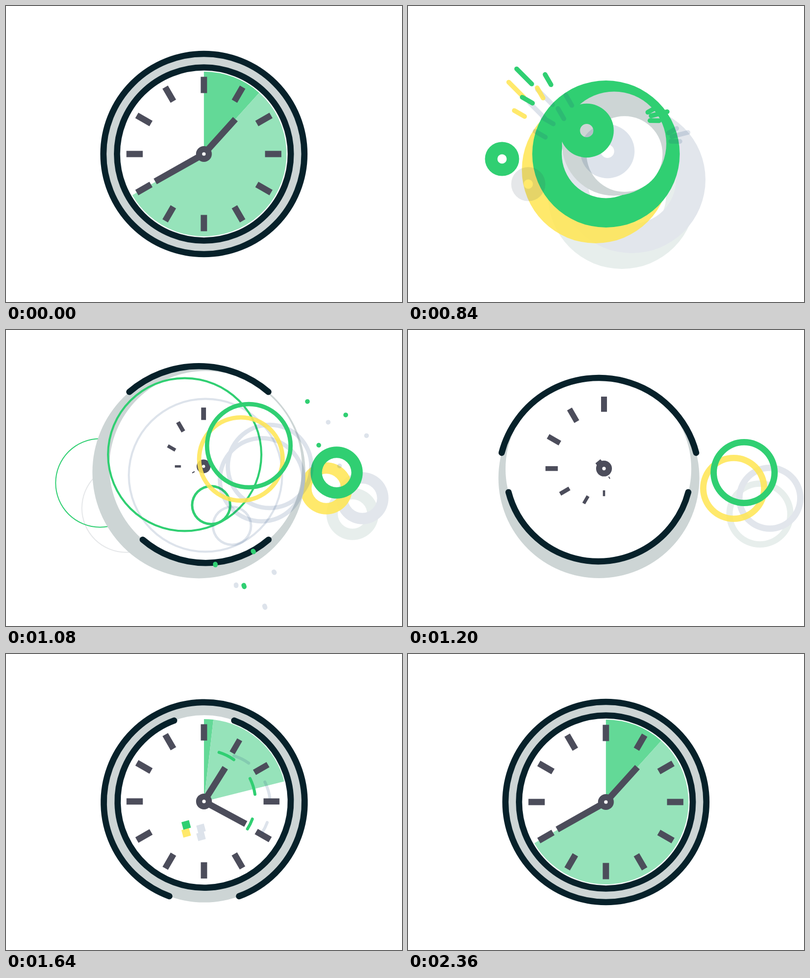
Recreate the animation shown at these times as an HTML page with a canvas. Size 800 by 600 pixels, loop 2.4 s.

```html
<!DOCTYPE html>
<html lang="en">
<head>
<meta charset="utf-8">
<title>Clock</title>
<style>
html, body { margin: 0; width: 100%; height: 100%; overflow: hidden; background: #fff; }
canvas { display: block; width: 800px; height: 600px; }
</style>
</head>
<body>
<canvas id="stage" width="800" height="600"></canvas>
<script>
const ctx = document.getElementById('stage').getContext('2d');
const LOOP = 2400, STEP = 40, START = 720, IMPACT = 960;
const TAU = Math.PI * 2, RAD = Math.PI / 180;
const DARK = '#07212a', GREY = '#cdd5d5', INK = '#4c4d5b', GREEN = '#30cf72';
const YELLOW = 'rgba(255,230,85,.87)', SHADE = 'rgba(30,70,120,.15)';

const clamp = v => Math.max(0, Math.min(1, v));
const easeOut = (u, p = 3) => 1 - (1 - clamp(u)) ** p;
const smooth = u => { u = clamp(u); return u * u * (3 - 2 * u); };

// Decaying swing after the impact: a at rest, b a quarter turn later
function swing(t, a, b, turn) {
  const s = Math.max(0, t - IMPACT), w = s / 240 * turn * RAD;
  return Math.exp(-s / 150) * (a * Math.cos(w) + b * Math.sin(w));
}

function disc(x, y, r, color) {
  ctx.fillStyle = color;
  ctx.beginPath();
  ctx.arc(x, y, Math.max(0, r), 0, TAU);
  ctx.fill();
}

// Half-open rim around the angle mid
function rim(c, mid, sweep) {
  ctx.strokeStyle = DARK;
  ctx.lineWidth = 12.6;
  ctx.lineCap = 'round';
  ctx.beginPath();
  ctx.arc(c.x, c.y, c.r, (mid - sweep) * RAD, (mid + sweep) * RAD);
  ctx.stroke();
}

// Layers are [color, ...offsets], back to front; offsets in a layer merge
const FAR = [['#e7eeec', [32, 84]], ['#e2e6ec', [52, 52]], [YELLOW, [-21, 32]], [GREEN, [0, 0]]];
const NEAR = [[SHADE, [26, 69], [42, 42]], [YELLOW, [-16, 27]], [GREEN, [0, 0]]];
const PLAIN = [[SHADE, [42, 42]], [GREEN, [0, 0]]];
const LEFT = [['rgba(60,70,90,.13)', [53, 51]], [GREEN, [0, 0]]];
const SQUARE = [[SHADE, [30, 23], [30, 7]], [YELLOW, [0, 16]], [GREEN, [0, 0]]];
const TRAIL = [[SHADE, [30, 7]], [GREEN, [0, 0]]];

function paint(shape, layers, width) {
  for (const [color, ...offsets] of layers) {
    const path = new Path2D();
    for (const [dx, dy] of offsets) path.addPath(shape, new DOMMatrix([1, 0, 0, 1, dx, dy]));
    if (width) {
      ctx.strokeStyle = color;
      ctx.lineWidth = width;
      ctx.lineCap = 'round';
      ctx.stroke(path);
    } else {
      ctx.fillStyle = color;
      ctx.fill(path);
    }
  }
}

// Disc that pops open into a ring and thins out
function ring(t, x, y, size, start, life, layers) {
  const u = (t - start) / life;
  if (u <= 0 || u >= 1) return;
  const outer = size * easeOut(u), shape = new Path2D();
  shape.arc(x, y, outer, 0, TAU);
  shape.closePath();
  shape.moveTo(x + outer * easeOut(u, 2), y);
  shape.arc(x, y, outer * easeOut(u, 2), 0, TAU, true);
  paint(shape, layers);
}

// Three dashes flying out from a point, the middle one farthest
function burst(t, x, y, angle, reach, start, layers) {
  const u = (t - start) / 280;
  if (u <= 0 || u >= 1) return;
  const shape = new Path2D();
  for (let i = -1; i <= 1; i++) {
    const a = (angle + i * 15) * RAD;
    const head = reach * (i ? .74 : 1) * easeOut(u);
    const tail = head * (1 - (i ? .45 : .6) * (1 - u) ** 2);
    shape.moveTo(x + tail * Math.cos(a), y + tail * Math.sin(a));
    shape.lineTo(x + head * Math.cos(a), y + head * Math.sin(a));
  }
  paint(shape, layers, 9.5);
}

// Square that turns, grows and hollows out
function square(t, x, y, turn, start) {
  const age = t - start;
  if (age <= 0 || age >= 370) return;
  const a = (turn - age * .042) * RAD, shape = new Path2D();
  const outline = (size, dir) => {
    for (let i = 0; i < 4; i++) {
      const b = a + dir * (i + .5) * TAU / 4, r = size * Math.SQRT1_2;
      shape[i ? 'lineTo' : 'moveTo'](x + r * Math.cos(b), y + r * Math.sin(b));
    }
    shape.closePath();
  };
  outline(26 * easeOut(age / 300), 1);
  outline(26 * clamp((age - 85) / 285), -1);
  paint(shape, SQUARE);
}

function sector(x, y, from, to, color) {
  if (to <= from) return;
  ctx.fillStyle = color;
  ctx.beginPath();
  ctx.moveTo(x, y);
  ctx.arc(x, y, 167, (from - 90) * RAD, (to - 90) * RAD);
  ctx.fill();
}

// Bar from radius a to b, turned about the dial centre
function bar(x, y, angle, a, b, width) {
  ctx.save();
  ctx.translate(x, y);
  ctx.rotate(angle * RAD);
  ctx.fillStyle = INK;
  ctx.fillRect(-width / 2, -b, width, b - a);
  ctx.restore();
}

function ticks(t, x, y) {
  for (let k = 0; k < 12; k++) {
    const s = easeOut((t - 887 - 41 * k) / 640, 4);
    bar(x, y, -30 * k, 123.5 * s, 156.5 * s, 12.8 * s);
  }
}

// Dashed trail that runs along with the minute hand
function trail(t, x, y, minute) {
  const head = minute + 4, tail = 256 * smooth((t - 1600) / 320);
  const phase = 17 + .17 * (t - 1640), shape = new Path2D();
  for (let k = 0; k < 6; k++) {
    const dash = phase + 46.5 * k;
    const a = (Math.max(tail, dash) - 90) * RAD;
    const b = (Math.min(head, dash + 18.5) - 90) * RAD;
    if (b <= a) continue;
    shape.moveTo(x + 104 * Math.cos(a), y + 104 * Math.sin(a));
    shape.arc(x, y, 104, a, b);
  }
  paint(shape, TRAIL, 6);
}

function clock(t) {
  const grow = easeOut((t - 800) / 160, 2);
  const place = (dx, dy, dr, r) => ({
    x: 399.8 + grow * dx, y: 300 + grow * dy, r: grow * (r + dr)
  });
  const body = place(swing(t, 38, -70, 90), swing(t, -48, 48, 45), swing(t, 38, 0, 90), 203);
  const face = place(swing(t, 86, -75, 90), swing(t, 0, -130, 45), swing(t, 0, 60, 90), 175.5);
  const { x, y } = place(swing(t, 17, -19, 90), swing(t, -2, -132, 45), 0, 0);

  disc(body.x, body.y, body.r, GREY);
  disc(face.x, face.y, face.r, '#fff');

  const hourFill = 42 * smooth((t - 1565) / 300);
  sector(x, y, 0, hourFill, '#63d997');
  sector(x, y, hourFill, 240 * smooth((t - 1520) / 320), '#96e3ba');

  const u = clamp((t - 930) / 1300);
  if (u > 0) {
    const sweep = 180 * easeOut(u ** 1.2, 3.3);
    rim(body, -90, sweep);
    rim(face, 90, sweep);
  }

  ticks(t, x, y);
  square(t, 364, 346.5, -11.6, 1560);
  square(t, 295, 310, 4.2, 1780);

  // The minute hand swings past its mark and settles back
  const hour = -40 + 82 * easeOut((t - 1200) / 870);
  const minute = -40 + 288 * smooth((t - 1320) / 600) - 7.5 * smooth((t - 1880) / 200);
  const reach = easeOut((t - 1135) / 1080);
  if (reach > 0) {
    bar(x, y, hour, 0, 95 * reach, 13);
    bar(x, y, minute, 0, 113 * reach, 13);
  }
  trail(t, x, y, minute);

  const hub = easeOut((t - 980) / 200);
  disc(x, y, 16 * hub, INK);
  disc(x, y, 3.6 * hub, '#fff');
}

function draw(t) {
  ctx.fillStyle = '#fff';
  ctx.fillRect(0, 0, 800, 600);
  ring(t, 400, 300, 199.4, 715, 340, FAR);
  ring(t, 190, 310, 91, 790, 340, LEFT);
  ring(t, 591 + 88 * easeOut((t - IMPACT) / 240), 289, 74, 900, 530, FAR);
  clock(t);
  ring(t, 361, 252.5, 157.6, 795, 340, PLAIN);
  ring(t, 414.5, 355, 42.7, 910, 260, PLAIN);
  ring(t, 490.5, 234.5, 91.5, 860, 320, NEAR);
  burst(t, 455, 232, -14.5, 239, 809, PLAIN);
  burst(t, 412, 319, 71, 214, 845, PLAIN);
  burst(t, 340, 248, 225, 235, 742, NEAR);
}

const begin = performance.now();
function tick() {
  const t = Math.floor(((performance.now() - begin) % LOOP) / STEP) * STEP;
  // The finished clock holds over the loop seam, then restarts
  draw(t < START ? t + LOOP : t);
  requestAnimationFrame(tick);
}
tick();
</script>
</body>
</html>
```
